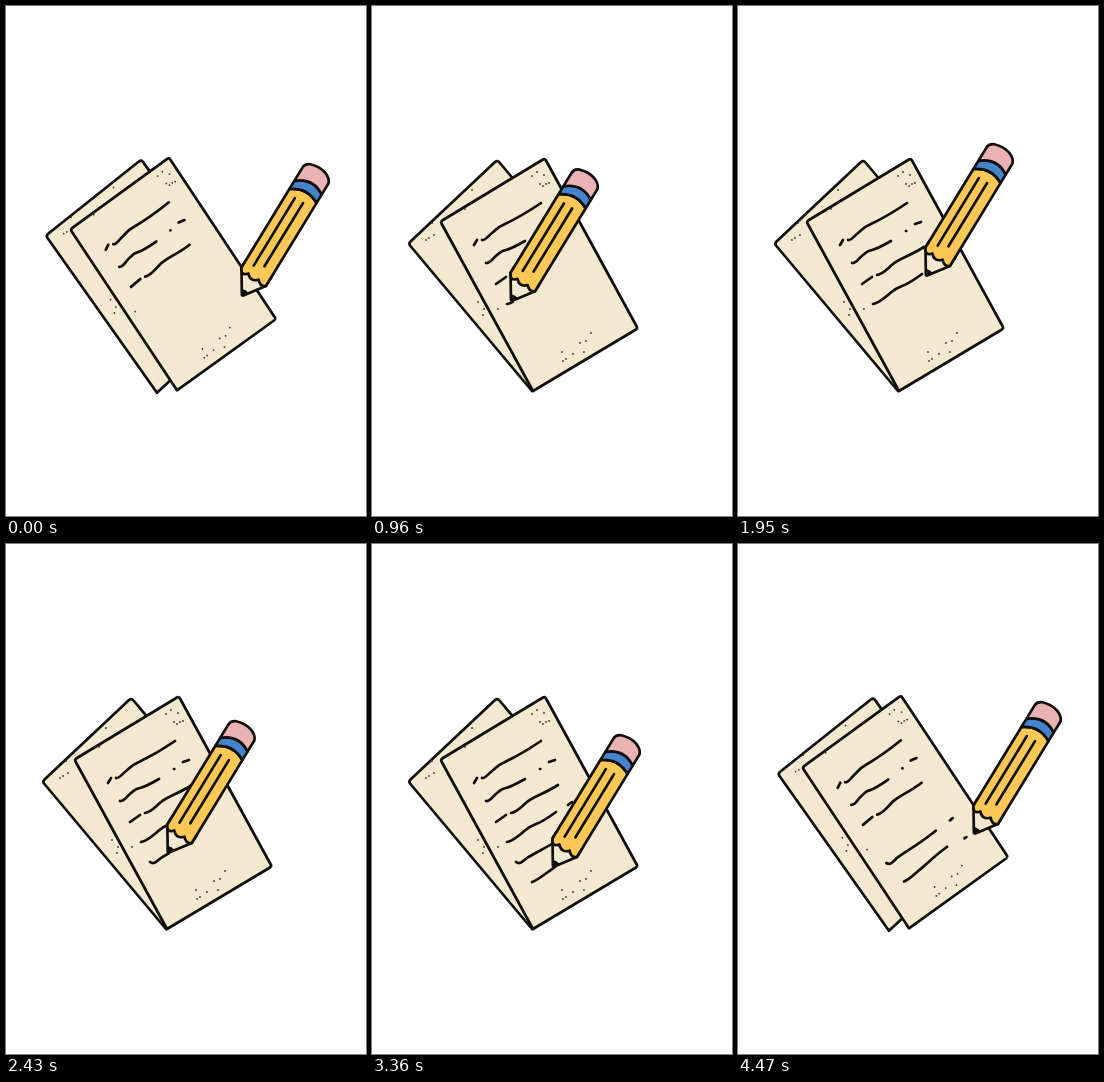
Write an HTML page that moves like this. It is 360 px wide and 510 px high and loops after 4500 ms.

```html
<!DOCTYPE html>
<html lang="en">
<head>
<meta charset="utf-8">
<title>Writing pencil</title>
<style>
html, body { margin: 0; width: 100%; height: 100%; overflow: hidden; background: #fff; }
svg { display: block; width: 100vw; height: 100vh; }
.ink { fill: none; stroke: #110f0d; stroke-width: 2.7; stroke-linecap: round; stroke-linejoin: round; }
.paper { fill: #f3e9d0; }
.specks { fill: none; stroke: #3a342b; stroke-width: 1.8; stroke-linecap: round; }
</style>
</head>
<body>
<svg viewBox="0 0 360 510">
  <g id="back">
    <path class="ink paper" d="M38.5 235.5 L123 156 Q125.500 154 127.500 156.500 L243 294 L160 385 L38 239.500 Q36.500 237.500 38.500 235.500Z"/>
    <path class="specks" d="M60 217h0M54 234h0M62 229h0M57 232h0M100 184h0M106 296h0M112 303h0M111 309h0"/>
  </g>
  <g id="front">
    <path class="ink paper" d="M71 214 L171 153.500 Q173 152.500 174 154.500 L265 321 Q265.500 322.500 264 323.500 L161 385 L69.500 217.500 Q68.500 215.500 71 214Z"/>
    <path class="specks" d="M160 170h0M172 169h0M174 178h0M171 180h0M168 178h0M177 177h0M165 166h0M93 203h0M126 303h0"/>
    <path class="specks" d="M219 327h0M190 346h0M208 337h0M214 335h0M212 346h0M201 348h0M194 353h0M191 355h0"/>
    <g id="text" class="ink"></g>
  </g>
  <g id="pencil" class="ink">
    <path fill="#f3e9d0" d="M-17 -23 L-2.500 0 Q-1.500 1 -.5 -.5 L13.500 -20 V-30 H-17Z"/>
    <path fill="#110f0d" stroke-width="1" d="M-5.500 -4.500 Q-1 -6 2.500 -4.500 L-1.500 .5Z"/>
    <path fill="#fbc856" d="M-17 -23 Q-13 -15 -8 -21.500 Q-2 -15 4 -21.500 Q9 -16 13.500 -20 V-117 Q-2 -126 -17 -115Z"/>
    <path d="M-7.600 -110 V-31 M2 -110 V-36"/>
    <path fill="#4584ca" d="M-17 -115 Q-2 -126 13.500 -117 V-127 Q-2 -137 -17 -124.500Z"/>
    <path fill="#eab2b3" d="M-17 -124.500 Q-2 -137 13.500 -127 V-140 Q12 -145 5 -147.500 Q-3 -150 -12 -147 Q-17 -145 -17 -140Z"/>
  </g>
</svg>
<script>
const LOOP = 4500, STEP = 30;
const $ = id => document.getElementById(id);

// path, writing start, writing end, time of removal
const strokes = [
  ['M102 239 L105 234'],
  ['M110 234 C113 235 116 230 120 227 S126 221 131 219 Q150 210 169 197'],
  ['M168 225 h.3'],
  ['M177 218 L183 216'],
  ['M114 257 C118 258 120 253 125 249 S130 245 134 244 S146 239 153 235'],
  ['M124 278 L134 271'],
  ['M139 269 C145 268 148 264 155 258 S172 250 186 241'],
  ['M135 298 C141 297 145 293 150 289 S156 283 164 280 S174 275 184 268', 860, 1800, 4380],
  ['M196 261 L200 258', 1990, 2050, 4380],
  ['M144 318 C148 321 151 317 155 314 S180 301 196 290', 2280, 2700, LOOP],
  ['M211 281 L214 279', 2820, 2880, LOOP],
  ['M160 338 C166 336 170 332 176 328 S194 314 206 307', 3120, 3600, LOOP],
  ['M224 300 L226 299', 3690, 3750, LOOP]
];

// time, tip x, tip y, eased travel
const tip = [
  [0, 238, 290],
  [720, 136, 299, true],
  [860, 136, 299],
  [1440, 165.5, 277.5],
  [1800, 187, 269],
  [1950, 190, 270],
  [2040, 204, 255, true],
  [2160, 176, 285],
  [2280, 146, 319],
  [2700, 196, 291],
  [2880, 220, 276, true],
  [3120, 160, 338, true],
  [3600, 206, 308],
  [3720, 222, 300],
  [3780, 228, 297],
  [3840, 238, 290],
  [LOOP, 238, 290]
];

const ramp = (t, a, b) => Math.min(1, Math.max(0, (t - a) / (b - a)));
const smooth = k => k * k * (3 - 2 * k);

const lines = strokes.map(([d, start, end, gone]) => {
  const el = document.createElementNS('http://www.w3.org/2000/svg', 'path');
  el.setAttribute('d', d);
  $('text').append(el);
  return { el, start, end, gone, length: el.getTotalLength() };
}).filter(line => line.start !== undefined);

function tipAt(t) {
  const i = Math.max(1, tip.findIndex(k => k[0] > t));
  const [t0, x0, y0] = tip[i - 1], [t1, x1, y1, eased] = tip[i];
  const k = ramp(t, t0, t1), e = eased ? smooth(k) : k;
  return [x0 + (x1 - x0) * e, y0 + (y1 - y0) * e];
}

function draw(t) {
  const closed = 1 - smooth(ramp(t, 0, 850)) + smooth(ramp(t, 3870, 4410));
  $('front').setAttribute('transform', `rotate(${-4.9 * closed} 158 268)`);
  $('back').setAttribute('transform', `rotate(${4.7 * closed} 134 276)`);

  for (const { el, start, end, gone, length } of lines) {
    const shown = ramp(t, start, end) * length;
    el.style.visibility = shown > 0 && t < gone ? 'visible' : 'hidden';
    el.style.strokeDasharray = `${shown} ${length + 5}`;
  }
  $('pencil').setAttribute('transform', `translate(${tipAt(t)}) rotate(31.4)`);
}

const origin = performance.now();
function tick() {
  const t = (performance.now() - origin) % LOOP;
  draw(Math.floor(t / STEP) * STEP);
  requestAnimationFrame(tick);
}
tick();
</script>
</body>
</html>
```
